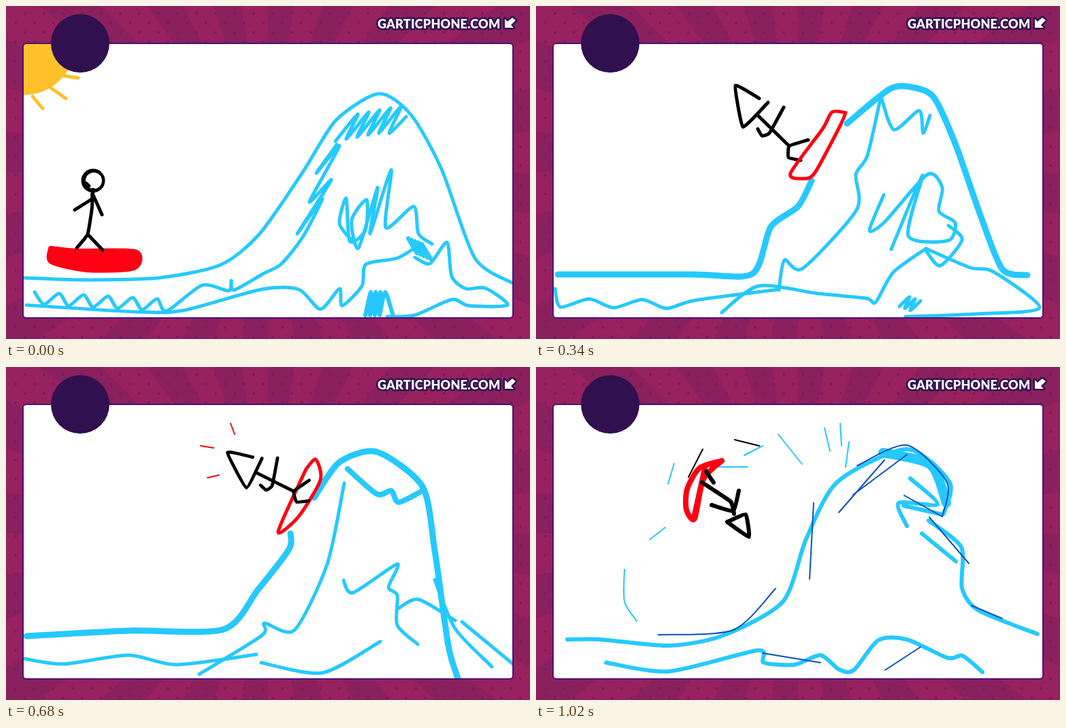
Recreate the animation shown at these times as an HTML page with a canvas. Size 770 by 490 pixels, loop 1.19 s.

```html
<!DOCTYPE html>
<html lang="en">
<head>
<meta charset="utf-8">
<title>Surfer on a wave</title>
<style>
html, body { margin: 0; width: 100%; height: 100%; overflow: hidden; background: #98215f; }
canvas { display: block; }
</style>
</head>
<body>
<canvas width="770" height="490"></canvas>
<script>
const ctx = document.querySelector('canvas').getContext('2d');
const BLUE = '#26c9ff', NAVY = '#0b50c0', RED = '#ff0013', BLACK = '#000', SUN = '#ffc02a', PLUM = '#30104f';
const HOLD = 170;

// Curve through "x y x y ..." points; bend 0 gives straight segments.
function trace(text, bend) {
  const n = text.split(' ').map(Number), count = n.length / 2;
  const at = i => { i = Math.max(0, Math.min(count - 1, i)); return [n[2 * i], n[2 * i + 1]]; };
  ctx.beginPath();
  ctx.moveTo(...at(0));
  for (let i = 0; i < count - 1; i++) {
    const [a, b, c, d] = [at(i - 1), at(i), at(i + 1), at(i + 2)];
    ctx.bezierCurveTo(b[0] + (c[0] - a[0]) * bend, b[1] + (c[1] - a[1]) * bend,
      c[0] - (d[0] - b[0]) * bend, c[1] - (d[1] - b[1]) * bend, ...c);
  }
}

function pen(color, width, paths, bend = 0.13) {
  ctx.strokeStyle = color;
  ctx.lineWidth = width;
  for (const path of paths.split('|')) { trace(path, bend); ctx.stroke(); }
}
const wave = (paths, width = 5) => pen(BLUE, width, paths);
const ink = (paths, width = 5) => pen(BLACK, width, paths, 0.06);
const board = (path, width = 5) => pen(RED, width, path);
const spray = (paths, color = BLUE) => pen(color, 2, paths);

function disc(color, x, y, r) {
  ctx.fillStyle = color;
  ctx.beginPath();
  ctx.arc(x, y, r, 0, 7);
  ctx.fill();
}

// Back-and-forth points: each stroke goes by (dx, dy), its start moves by (sx, sy).
const hatch = (x, y, sx, sy, dx, dy, n) => Array.from({ length: n }, (_, i) => {
  const px = x + i * sx, py = y + i * sy;
  return `${px} ${py} ${px + dx} ${py + dy}`;
}).join(' ');

// Inner slopes shared by the two steep-climb scenes
function slopes() {
  wave('506 137 487 220 470 248 471 300 392 386 365 374 357 418|508 137 526 182 563 154 569 187 579 161');
  wave('28 416 ' + hatch(36, 443, 78, 1, 42, -12, 3) + ' 357 417');
  wave('273 451 327 412 414 423 485 430 499 436 525 392 573 357');
  wave('511 278 490 330 512 318 575 248 597 267 592 302 616 319 606 345 547 338 568 249 522 358|606 323 626 344 594 382 573 360');
  wave(hatch(534, 442, 8, 3, 15, -14, 3));
}

// Thrown-back surfer, placed by the hip
function surfer(x, y, degrees, scale) {
  ctx.save();
  ctx.translate(x, y);
  ctx.rotate(degrees * Math.PI / 180);
  ctx.scale(scale, scale);
  ink('-44 -70 -79 -89 -68 -28 -31 -64|-47 -46 0 0|-8 -57 -29 -19 -40 -15 -46 -25|28 -9 0 0 -1 17 17 21');
  ctx.restore();
}

const scenes = [
  () => {
    disc(SUN, 26, 55, 76);
    pen(SUN, 5, '82 102 106 106|65 120 88 136|39 133 54 151');
    wave('26 400 110 403 225 400 315 381 372 336 437 243 485 168 548 129 595 160 640 240 689 371 745 408');
    wave(hatch(484, 199, 16, -3, 33, -40, 5) + ' 563 187 588 163');
    wave('486 204 456 246 490 206 446 288 478 256 428 335 465 283 436 340 404 380 378 394 335 418 331 404 327 419 288 411 ' + hatch(236, 449, -36, -2, -14, -18, 6));
    wave('30 440 190 450 260 448 375 417 430 417 462 446 490 416 494 441 523 412 529 380 575 371 608 351');
    wave('601 370 623 379 648 348 655 398 676 416 704 415 737 440 680 441 655 432 600 455 560 457');
    wave(hatch(528, 455, 7, 0, 8, -34, 4) + ' 568 453', 6);
    wave('508 345 490 320 500 283 505 346 528 330 530 285 508 315 518 356 546 267 535 335 566 241 558 326 599 295 606 335 626 350');
    wave(hatch(591, 342, 5, 2, 13, 22, 5), 6);
    pen(RED, 8, '66 357 105 361 190 362 188 385 120 388 67 376 66 357');
    ctx.fillStyle = RED;
    ctx.fill();
    disc(BLACK, 128, 257, 17.5);
    disc('#fff', 129, 257, 12);
    ink('122 265 118 261|128 270 126 300 120 336 104 356|120 336 142 359|101 300 126 284 127 276 141 307');
  },
  () => {
    wave('26 395 76 402 185 402 213 393 245 394 305 398 345 345 402 275 470 160 508 123 545 118 590 145 632 250 662 330 668 375 745 405');
    wave('26 418 ' + hatch(36, 440, 72, 5, 44, -16, 3) + ' 262 445 276 419 320 403 358 420 376 379 382 398 431 342 462 280 490 195 502 163 514 150 517 195 570 150 572 180 586 169');
    wave('252 458 325 425 410 426 437 438 482 420 490 445 499 420 523 418 517 405 543 366 576 372 590 359 655 356 665 412 722 422 728 442 640 440 610 448 562 451');
    wave(hatch(525, 455, 9, 0, 9, -32, 4) + ' 568 453', 7);
    wave('507 271 488 330 508 328 505 271 504 345 531 276 505 352 549 282 520 352 565 243 588 308 608 315 588 327');
    wave(hatch(588, 335, 4, 12, 30, -3, 5));
    board('133 354 195 352 293 351 270 372 235 385 185 380 137 355');
    ink('230 224 220 187 211 187 194 238 205 247 234 247|222 249 222 332|194 273 215 289|234 281 259 262|198 348 222 333 235 337 263 358');
  },
  () => {
    wave('32 395 230 395 318 394 345 325 385 295 405 257|457 173 520 122 555 120 585 135 617 205 652 305 685 387 722 396', 9);
    slopes();
    wave('573 357 638 385 672 391 740 444 650 453 543 457');
    surfer(372, 206, 0, 1);
    board('455 157 435 156 421 181 374 246 393 254 410 245 447 176 455 157');
  },
  () => {
    wave('26 395 65 400 175 388 318 394 350 318 388 291 409 256', 9);
    wave('457 172 535 118 617 167 622 238 655 300 665 372 728 402');
    slopes();
    wave('600 348 645 388 675 391 715 444 745 450 543 457');
    surfer(381, 204, -26, 1);
    board('412 150 422 146 436 160 434 195 408 257 380 265 412 184 412 150');
  },
  () => {
    wave('30 396 180 388 320 386 370 328 416 268 418 245|453 192 490 140 545 125 612 176 630 270 650 410 664 458', 9);
    wave('502 150 545 187 566 182 577 199 612 182', 8);
    wave('497 171 472 290 424 387 380 377 376 395 284 452');
    wave('26 429 85 437 180 424 250 438 368 423|375 435 465 450 550 404');
    wave('496 314 510 332 575 290 562 324 575 336 575 380 605 408|577 355 606 342 660 373|630 313 660 385 714 441|670 375 745 437');
    board('441 150 455 136 462 166 430 220 400 242 441 150');
    surfer(423, 183, -18, 0.95);
    spray('330 83 336 99|286 116 305 119|296 163 313 159', RED);
  },
  () => {
    wave('38 394 95 402 310 370 355 343 422 248 500 178 582 155 675 207 718 250 650 257 622 290 665 368 738 417', 6);
    wave('540 213 531 228 600 232 605 285 635 306|95 442 150 449 285 422 390 433 437 422 480 440 550 410 605 411 645 446 704 441', 6);
    board('280 126 300 106 350 95 390 103 413 158 382 119 350 116 280 126');
    ink('319 131 335 135 352 154 357 184 348 208|375 120 349 151|322 188 350 203 388 182|335 212 371 212 351 246 335 212', 6);
    spray('421 92 427 104|446 95 454 112|462 118 461 144|442 158 441 177|458 182 448 213|522 132 512 142|483 167 475 186|518 157 506 172');
    spray('207 176 222 173|158 245 149 260|153 319 157 331|332 58 345 63');
    ctx.setLineDash([10, 30]);
    ctx.beginPath();
    ctx.ellipse(325, 238, 72, 98, 0, 1.4, 4.2);
    ctx.stroke();
    ctx.setLineDash([]);
  },
  () => {
    wave('46 401 95 401 195 410 275 395 363 345 397 253 443 169 545 121 608 170 599 216', 6);
    wave('510 126 580 144 603 200', 14);
    wave('550 164 590 202 533 200 545 234|540 204 597 217|567 245 617 286|577 226 625 265 626 325 650 358 737 393', 6);
    wave('103 435 195 448 326 417 335 435 380 438 418 424 445 445 467 446 503 402 545 401 605 428 627 425 656 449', 6);
    spray('180 394 290 387 352 326|408 200 402 312|445 214 512 137|466 188 545 129|472 145 545 115 604 170 597 220', NAVY);
    spray('541 189 597 220|578 221 636 289|640 351 685 370|333 421 418 435|513 446 565 412', NAVY);
    spray('203 142 194 172|356 99 391 143|424 90 432 124|447 83 449 116|460 110 455 147|268 147 311 147|333 116 306 130|190 236 167 254|130 298 130 345 148 374');
    spray('245 121 224 162|292 107 328 116', BLACK);
    board('273 138 240 149 222 180 221 210 233 223 246 165 273 138|248 149 232 222', 8);
    ink('250 154 261 170|244 170 286 198 291 216|298 182 290 212 258 203|281 228 308 217 313 250 281 228', 6);
  },
];

function backdrop() {
  ctx.fillStyle = '#98215f';
  ctx.fillRect(0, 0, 770, 490);
  ctx.fillStyle = '#8b205e';
  for (let i = 0; i < 20; i++) {
    const angle = i * Math.PI / 10;
    ctx.beginPath();
    ctx.moveTo(385, 245);
    ctx.arc(385, 245, 500, angle, angle + Math.PI / 20);
    ctx.fill();
  }
  for (let row = 0; row < 36; row++)
    for (let x = 14 + row % 2 * 14; x < 770; x += 28) disc('#7c1d59', x, row * 14 - 3, 2);
}

function header() {
  disc(PLUM, 109, 55, 43);
  ctx.font = '900 18px Lato, sans-serif';
  ctx.letterSpacing = '0.2px';
  ctx.strokeStyle = PLUM;
  ctx.lineWidth = 5;
  ctx.strokeText('GARTICPHONE.COM', 546, 33);
  ctx.fillStyle = '#fff';
  ctx.fillText('GARTICPHONE.COM', 546, 33);
  pen(PLUM, 5, '733 19 737 23 744 17 749 21 742 28 746 32 733 32 733 19', 0);
  ctx.fill();
}

function render(now) {
  backdrop();
  const panel = new Path2D();
  panel.roundRect(25, 55, 720, 404, 5);
  ctx.fillStyle = '#fff';
  ctx.fill(panel);
  ctx.lineCap = ctx.lineJoin = 'round';
  ctx.save();
  ctx.clip(panel);
  scenes[Math.floor(now / HOLD) % scenes.length]();
  ctx.restore();
  ctx.strokeStyle = '#4b1178';
  ctx.lineWidth = 2;
  ctx.stroke(panel);
  header();
  requestAnimationFrame(render);
}
requestAnimationFrame(render);
</script>
</body>
</html>
```
